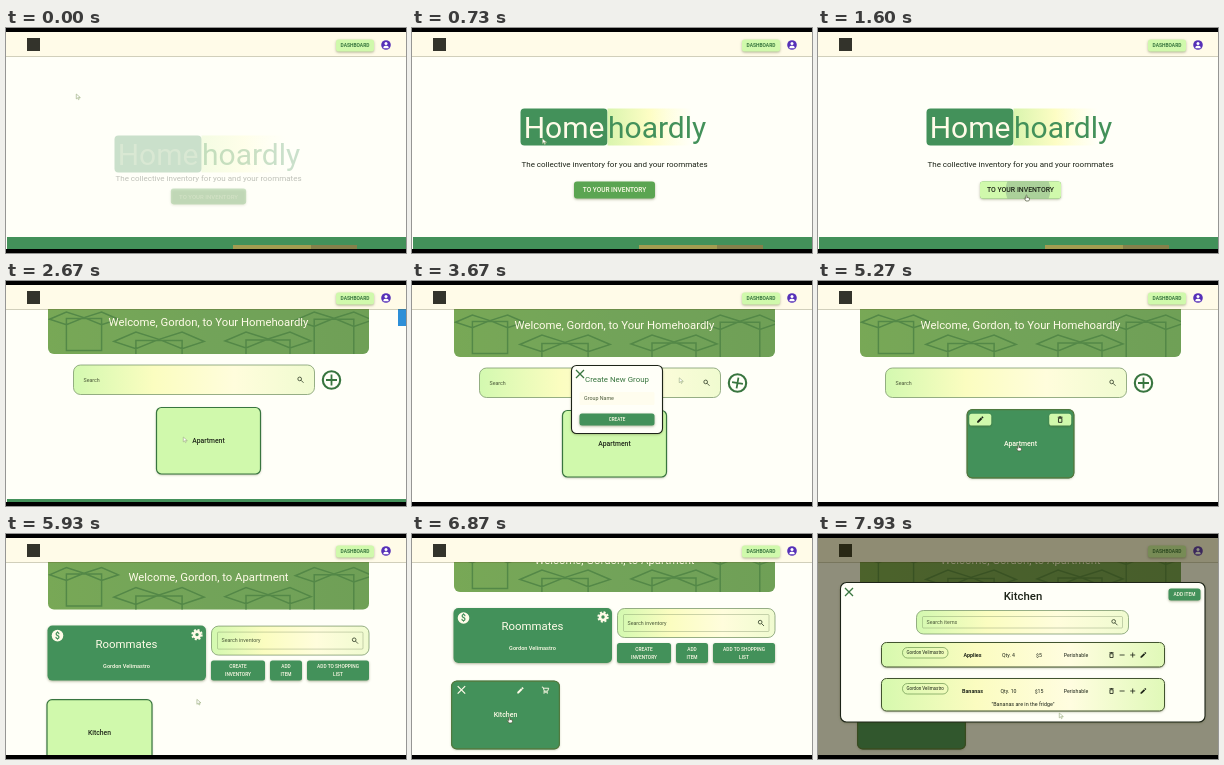
These frames come from a looping animation (400x225 px, 8000 ms). An HTML page with a canvas:

```html
<!DOCTYPE html>
<html lang="en">
<head>
<meta charset="utf-8">
<title>Shared inventory walkthrough</title>
<style>
html, body { margin: 0; width: 100%; height: 100%; overflow: hidden; background: #000; }
canvas { display: block; width: 100vw; height: 100vh; }
</style>
</head>
<body>
<canvas></canvas>
<script>
const LOOP = 8000;
const PAGE = '#fffff8', CREAM = '#fffbe8', GREEN = '#43915a', DARK = '#38753f', LIME = '#d0f9ac', INK = '#1d2418';
const USER = 'Gordon Velimastro';
const canvas = document.querySelector('canvas');
const c = canvas.getContext('2d');

// progress: eased 0..1 between two times
const progress = (t, from, to) => {
  const p = Math.min(1, Math.max(0, (t - from) / (to - from)));
  return p * p * (3 - 2 * p);
};
const between = (t, from, to, ramp = 130) => progress(t, from, from + ramp) * (1 - progress(t, to, to + ramp));

function group(alpha, draw) {
  if (alpha <= 0) return;
  c.save();
  c.globalAlpha *= alpha;
  draw();
  c.restore();
}

function shifted(dy, draw) {
  c.save();
  c.translate(0, dy);
  draw();
  c.restore();
}

function scaled(x, y, scale, draw) {
  c.save();
  c.translate(x, y);
  c.scale(scale, scale);
  c.translate(-x, -y);
  draw();
  c.restore();
}

function box(x, y, w, h, r, fill, stroke, width = 1) {
  c.beginPath();
  c.roundRect(x, y, w, h, r);
  if (fill) { c.fillStyle = fill; c.fill(); }
  if (stroke) { c.strokeStyle = stroke; c.lineWidth = width; c.stroke(); }
}

function shadowBox(x, y, w, h, r, fill, stroke, width) {
  c.save();
  c.shadowColor = 'rgba(60,70,20,.4)';
  c.shadowBlur = 2.5 * canvas.width / 400;
  c.shadowOffsetY = canvas.width / 400;
  box(x, y, w, h, r, fill);
  c.restore();
  if (stroke) box(x, y, w, h, r, null, stroke, width);
}

function disc(x, y, r, fill) {
  c.beginPath();
  c.arc(x, y, r, 0, 7);
  c.fillStyle = fill;
  c.fill();
}

// y is the middle of the capitals
function text(s, x, y, size, color = INK, align = 'center', weight = 400) {
  c.font = `${weight} ${size}px Roboto, sans-serif`;
  c.textAlign = align;
  c.fillStyle = color;
  c.fillText(s, x, y + size * .355);
}

function button(label, x, y, w, h, size = 4.8) {
  shadowBox(x, y, w, h, 2.5, GREEN);
  const lines = label.split('\n');
  lines.forEach((line, i) => text(line, x + w / 2, y + h / 2 + (i - (lines.length - 1) / 2) * 8, size, CREAM, 'center', 500));
}

function gradient(x, w, ...colors) {
  const g = c.createLinearGradient(x, 0, x + w, 0);
  colors.forEach((color, i) => g.addColorStop(i / (colors.length - 1), color));
  return g;
}

// icons on a 24 unit grid
const ICONS = {
  pencil: ['M3 17V21H7L18 10L14 6ZM15 5L19 9L21 7Q22 6 21 5L19 3Q18 2 17 3Z', true],
  trash: ['M7 8V20H17V8ZM5 5H19M9 4H15', false],
  cart: ['M2 3H5L9 14H18L21 6H6M9 14L7 17H19M8 20V22M17 20V22', false],
  search: ['M15 9.5A5.5 5.5 0 1 1 4 9.5A5.5 5.5 0 1 1 15 9.5M13.5 13.5L21 21', false],
  cross: ['M4 4L20 20M20 4L4 20', false],
  plus: ['M4 12H20M12 4V20', false],
  minus: ['M4 12H20', false],
  arrow: ['M2 1V19L7 15L10 22L13 20L10 14H17Z', true],
  hand: ['M8 23L2 13L4 11L8 14V3Q10 0 12 3V10L21 12V18L18 23Z', true]
};
for (const icon of Object.values(ICONS)) icon[0] = new Path2D(icon[0]);

function icon(name, x, y, size, color = INK, outline, angle = 0) {
  const [path, solid] = ICONS[name];
  c.save();
  c.translate(x, y);
  c.rotate(angle);
  c.scale(size / 24, size / 24);
  c.translate(-12, -12);
  c.lineWidth = 2.6;
  c.fillStyle = color;
  c.strokeStyle = outline || color;
  if (solid) c.fill(path);
  if (!solid || outline) c.stroke(path);
  c.restore();
}

function header() {
  c.fillStyle = 'rgba(90,85,30,.28)';
  c.fillRect(0, 28, 400, 1);
  c.fillStyle = CREAM;
  c.fillRect(0, 4, 400, 24);
  box(21, 10, 13, 13, 0, '#33332b');
  shadowBox(330, 11.5, 38, 12, 2.5, LIME);
  text('DASHBOARD', 349, 17.5, 4.9, DARK, 'center', 600);
  disc(380, 17, 4.8, '#5630b8');
  disc(380, 15.6, 1.5, '#fff');
  box(377.3, 17.7, 5.4, 2.6, [2, 2, 0, 0], '#fff');
}

function footer(y) {
  c.fillStyle = GREEN;
  c.fillRect(1, y, 399, 40);
  c.fillStyle = '#a39c50';
  c.fillRect(227, y + 8, 78, 20);
  c.fillStyle = '#85804a';
  c.fillRect(305, y + 8, 46, 20);
}

// the three rows rise into place, the upper ones from further below
function hero(t) {
  const away = 1 - progress(t, -350, 650);
  const rise = away / (1 - progress(0, -350, 650));
  shifted(27 * rise, () => {
    box(108.5, 80.5, 87, 37, 4, GREEN);
    c.fillStyle = gradient(195.5, 84, '#d9f5ae', '#fdfdc4', 'rgba(255,255,210,0)');
    c.fillRect(195.5, 80.5, 84, 37);
    text('Home', 152, 99, 30, CREAM);
    text('hoardly', 196, 99, 30, GREEN, 'left');
  });
  shifted(14 * rise, () => text('The collective inventory for you and your roommates', 202.5, 136, 8));
  const hover = progress(t, 1250, 1400);
  shifted(6.5 * rise, () => scaled(202.5, 162, 1 - .07 * rise, () => {
    shadowBox(162, 153.5, 81, 17, 3, '#5ba552');
    group(1 - hover, () => text('TO YOUR INVENTORY', 202.5, 162, 6.5, CREAM, 'center', 500));
    group(hover, () => {
      box(162, 153.5, 81, 17, 3, LIME);
      c.save();
      c.clip();
      group(.4 * progress(t, 1500, 1570), () => disc(210, 162, 24 * progress(t, 1500, 1620), '#73947f'));
      c.restore();
      text('TO YOUR INVENTORY', 202.5, 162, 6.9, INK, 'center', 500);
    });
  }));
}

function carton(x, y, s) {
  c.beginPath();
  c.rect(x - 22 * s, y + 8 * s, 44 * s, 40 * s);
  for (const d of [-1, 1]) {
    c.moveTo(x, y + 7 * s);
    c.lineTo(x + 22 * s * d, y);
    c.lineTo(x + 43 * s * d, y + 9 * s);
    c.lineTo(x + 22 * s * d, y + 16 * s);
    c.lineTo(x, y + 7 * s);
  }
  c.stroke();
}

function banner(title) {
  c.save();
  box(42, -20, 321, 96, 6, gradient(42, 321, '#80ad5c', '#78a760', '#74a25c'));
  c.clip();
  c.strokeStyle = '#4f8248';
  c.lineWidth = 1.5;
  [[78, 34, .8], [153, 54, 1.05], [262, 54, 1], [328, 34, .9]].forEach(b => carton(...b));
  c.fillStyle = 'rgba(95,150,70,.25)';
  c.fillRect(42, 4, 321, 72);
  c.restore();
  text(title, 202.5, 43.5, 11.3, CREAM);
}

function searchBar(x, y, w, h, label, inset) {
  box(x, y, w, h, 7, gradient(x, w, '#d3f9b0', '#fbfdc0', '#fffddc', '#f0fbd0'), '#7d9a6c', .8);
  if (inset) box(x + 6, y + 6, w - 12, h - 12, 1, null, 'rgba(100,120,80,.55)', .6);
  text(label, x + 10, y + h / 2, 5.3, '#4c5a3a', 'left');
  icon('search', x + w - 14, y + h / 2, 8, '#3a4730');
}

function card(label, x, y, w, h, hover, tools) {
  scaled(x + w / 2, y + h / 2, 1 + .025 * hover, () => {
    shadowBox(x, y, w, h, 5, LIME, DARK, 1.2);
    group(hover, () => {
      box(x, y, w, h, 5, GREEN, '#54783c', 1);
      tools();
    });
    group(1 - hover, () => text(label, x + w / 2, y + h / 2, 6.8, INK, 'center', 500));
    group(hover, () => text(label, x + w / 2, y + h / 2, 6.8, CREAM, 'center', 500));
  });
}

function dashboard(t) {
  shifted(-3 * (1 - progress(t, 2700, 2950)), () => {
    banner('Welcome, Gordon, to Your Homehoardly');
    searchBar(67.5, 87, 241, 29.5, 'Search');
    const turn = progress(t, 3150, 3400) - progress(t, 3480, 3720);
    c.beginPath();
    c.arc(325.5, 102, 8.7, 0, 7);
    c.strokeStyle = DARK;
    c.lineWidth = 2.1;
    c.stroke();
    icon('plus', 325.5, 102, 16.5, DARK, null, turn * Math.PI / 2);
    card('Apartment', 150.5, 129.5, 104, 66.5, progress(t, 4930, 5080), () => {
      for (const [name, x] of [['pencil', 152.5], ['trash', 230.5]]) {
        shadowBox(x, 133.5, 21.5, 11.5, 2.5, LIME);
        icon(name, x + 10.7, 139.2, 8);
      }
    });
    footer(221);
  });
  group(between(t, 2250, 2850), () => box(392, 28, 8, 17, 0, '#2d8fd8'));
  group(between(t, 3430, 4480), () => {
    shadowBox(159.5, 84.5, 91, 68, 5, PAGE, INK, 1.1);
    icon('cross', 168, 93, 12, DARK);
    text('Create New Group', 205, 98, 7.9, DARK);
    box(167.5, 111, 75, 13, 1.5, '#fffdee');
    text('Group Name', 172, 117.5, 5.35, '#4c5a3a', 'left');
    button('CREATE', 167.5, 132.5, 75, 12, 4.6);
  });
}

function gear(x, y) {
  c.save();
  c.strokeStyle = CREAM;
  c.lineWidth = 2.6;
  c.beginPath();
  c.arc(x, y, 3, 0, 7);
  c.stroke();
  c.lineWidth = 2;
  c.setLineDash([2, Math.PI * 9.4 / 8 - 2]);
  c.beginPath();
  c.arc(x, y, 4.7, 0, Math.PI * 2);
  c.stroke();
  c.restore();
}

function apartment(t) {
  shifted(-18 * progress(t, 5900, 6250), () => {
    banner('Welcome, Gordon, to Apartment');
    shadowBox(41.5, 92, 158.5, 55, 5, GREEN);
    disc(51.5, 102, 5.8, CREAM);
    text('$', 51.5, 102, 8.5, GREEN, 'center', 700);
    gear(191, 101);
    text('Roommates', 120.5, 110, 11.4, CREAM);
    text(USER, 120.5, 132, 5.6, CREAM, 'center', 500);
    searchBar(205.5, 92.5, 157.5, 29, 'Search inventory', true);
    button('CREATE\nINVENTORY', 205, 127, 54, 20);
    button('ADD\nITEM', 264, 127, 32, 20);
    button('ADD TO SHOPPING\nLIST', 301, 127, 62, 20);
    card('Kitchen', 41, 166, 105, 66, progress(t, 6520, 6650), () => {
      icon('cross', 50.5, 174.5, 11, CREAM);
      icon('pencil', 108, 175, 8, CREAM);
      icon('cart', 132.5, 175, 8.5, CREAM);
    });
  });
}

function item(y, h, name, quantity, price, note) {
  shadowBox(63.5, y, 283, h, 5, gradient(63, 284, '#d6f9ae', '#fbfcc0', '#fffde0', '#e0f9b8'), '#42542f', 1);
  const mid = y + 12.5;
  box(84.5, y + 5, 45.5, 10.5, 5, null, '#6c9550', .7);
  text(USER, 107.2, y + 10.2, 4.5);
  text(name, 154.5, mid, 5.4, INK, 'center', 700);
  text(quantity, 190.5, mid, 5.2);
  text(price, 221, mid, 5.2);
  text('Perishable', 258, mid, 5.2);
  ['trash', 'minus', 'plus', 'pencil'].forEach((tool, i) => icon(tool, 293.5 + i * 10.6, mid, 7.5));
  if (note) text(note, 205, y + 26, 5.4);
}

function kitchen() {
  c.fillStyle = 'rgba(32,30,0,.5)';
  c.fillRect(0, 4, 400, 217);
  shadowBox(22.5, 48.5, 364.5, 139.5, 6, PAGE, INK, 1.1);
  icon('cross', 31, 58, 12, DARK);
  text('Kitchen', 205, 61.5, 11.4, INK, 'center', 500);
  button('ADD ITEM', 350.5, 54.5, 32, 12);
  searchBar(98.5, 76.5, 212, 23.5, 'Search items', true);
  item(108.5, 24.5, 'Applies', 'Qty. 4', '$5');
  item(144.5, 32.5, 'Bananas', 'Qty. 10', '$15', '"Bananas are in the fridge"');
}

// pointer stops: time, x, y
const STOPS = [
  [0, 73, 69], [200, 73, 69], [1350, 209, 170], [1800, 209, 170], [2500, 180, 159], [2700, 180, 159],
  [3200, 326, 103], [3450, 326, 103], [4000, 168, 94], [4550, 168, 94], [5100, 201, 167],
  [5800, 201, 167], [6600, 98, 186], [7150, 98, 186], [7700, 244, 182], [LOOP, 244, 182]
];

function pointer(t) {
  const i = STOPS.findIndex(s => s[0] > t);
  const [a, b] = [STOPS[i - 1], STOPS[i]];
  const p = progress(t, a[0], b[0]);
  const x = a[1] + (b[1] - a[1]) * p, y = a[2] + (b[2] - a[2]) * p;
  const onLink = [[1280, 1850], [3150, 3500], [3960, 4600], [4930, 5850], [6520, 7200]].some(([s, e]) => t >= s && t < e);
  icon(onLink ? 'hand' : 'arrow', x, y, 6.5, '#fff', onLink ? '#4b5535' : '#a3b488');
}

function draw(now) {
  const t = now % LOOP;
  const width = Math.round(innerWidth * devicePixelRatio), height = Math.round(innerHeight * devicePixelRatio);
  if (canvas.width !== width || canvas.height !== height) Object.assign(canvas, { width, height });
  c.setTransform(width / 400, 0, 0, height / 225, 0, 0);
  c.fillStyle = '#000';
  c.fillRect(0, 0, 400, 225);
  c.save();
  c.beginPath();
  c.rect(0, 4, 400, 217);
  c.clip();
  c.fillStyle = PAGE;
  c.fillRect(0, 4, 400, 217);
  if (t < 1800) {
    group(progress(t, -350, 650) * (1 - progress(t, 1720, 1800)), () => hero(t));
    footer(209);
  } else if (t < 5480) {
    group(progress(t, 1950, 2350) * (1 - progress(t, 5400, 5480)), () => dashboard(t));
  } else {
    group(progress(t, 5480, 5850), () => apartment(t));
  }
  header();
  group(progress(t, 7080, 7300), kitchen);
  pointer(t);
  c.restore();
  requestAnimationFrame(() => draw(performance.now() - start));
}

const start = performance.now();
draw(0);
</script>
</body>
</html>
```
